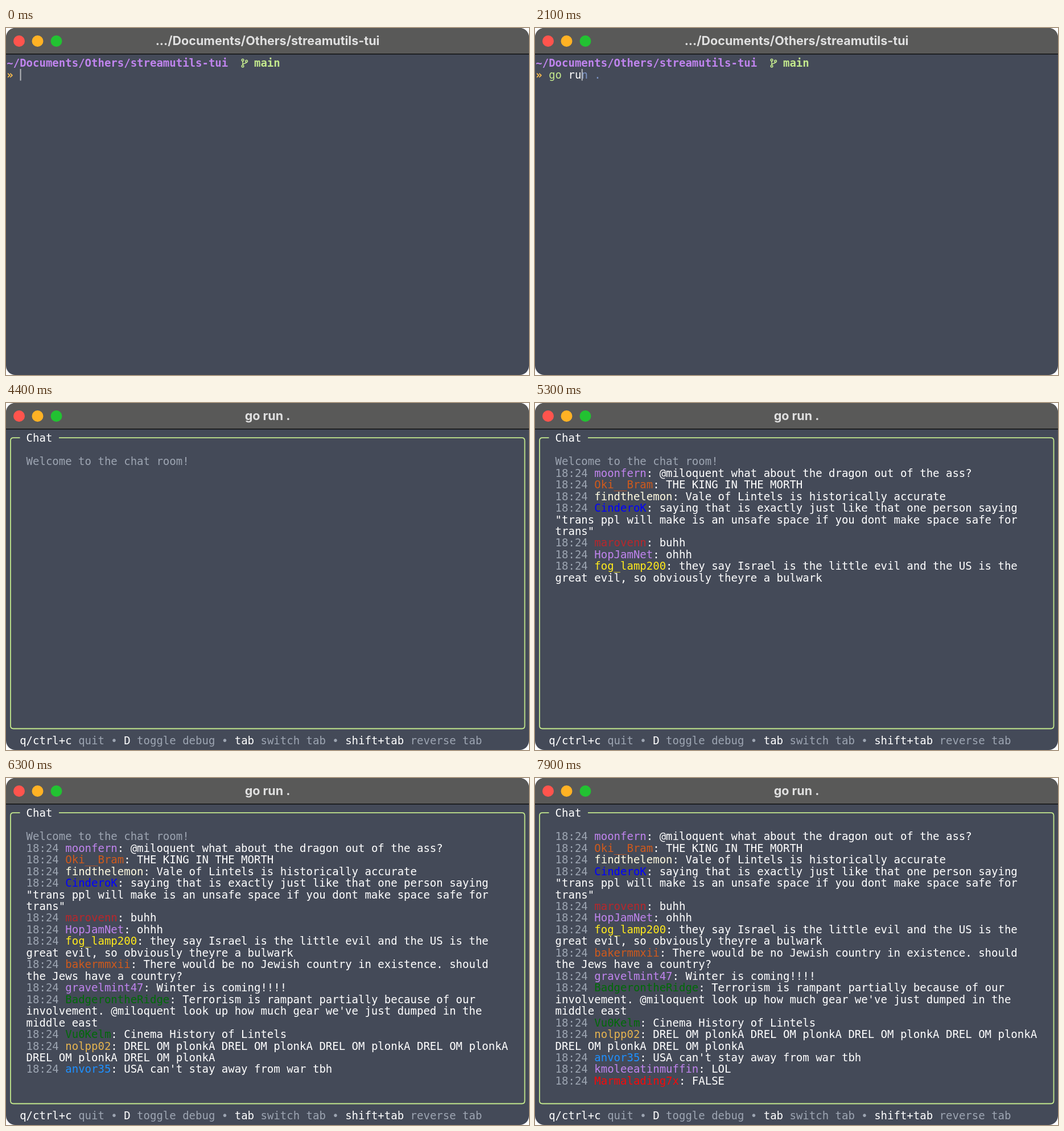
Write an HTML page that moves like this. It is 919 by 610 pixels and loops after 8000 ms.

```html
<!DOCTYPE html>
<html lang="en">
<head>
<meta charset="utf-8">
<title>Terminal chat</title>
<style>
html, body { margin: 0; width: 100%; height: 100%; overflow: hidden; background: #fff; }
svg { display: block; }
text { white-space: pre; }
#screen { font: 19px "DejaVu Sans Mono", "Liberation Mono", monospace; fill: #fff; }
#title { font: 700 21.5px Inter, "Open Sans", sans-serif; fill: #e0e0e0; text-anchor: middle; }
</style>
</head>
<body>
<svg width="919" height="610" viewBox="0 0 919 610">
  <clipPath id="win"><rect width="919" height="610" rx="16.5"/></clipPath>
  <g clip-path="url(#win)">
    <rect width="919" height="610" fill="#444a58"/>
    <rect width="919" height="46" fill="#595958"/>
    <rect y="45" width="919" height="1.5" fill="#111"/>
    <circle cx="23" cy="23" r="10" fill="#ff544d"/>
    <circle cx="55.5" cy="23" r="10" fill="#ffb224"/>
    <circle cx="88.5" cy="23" r="10" fill="#22c232"/>
    <text id="title" x="459.5" y="29.5"></text>
    <g id="screen"></g>
  </g>
</svg>
<script>
const LOOP = 8000, ENTER = 2900, START = 3800;
const CELL = 11.438, ROW = 20.46, LEFT = 1.3, BASE = 68.3;
const WRAP = 74, VISIBLE = 22;
const WHITE = '#fff', GREY = '#9da5b2', GREEN = '#c3e88d', PURPLE = '#c084ee', GOLD = '#ffc04d';
const ORANGE = '#d05a1c', DARK_GREEN = '#006a08';

const command = 'go run .';
const keyTimes = [1500, 1600, 1800, 1900, 2050, 2200, 2350, 2500];

// arrival time, name colour, name, message
const messages = [
  [4600, PURPLE, 'moonfern', '@miloquent what about the dragon out of the ass?'],
  [4700, ORANGE, 'Oki__Bram', 'THE KING IN THE MORTH'],
  [4800, '#fffbe0', 'findthelemon', 'Vale of Lintels is historically accurate'],
  [4900, '#0000ff', 'CinderoK', 'saying that is exactly just like that one person saying "trans ppl will make is an unsafe space if you dont make space safe for trans"'],
  [5000, '#b8272c', 'marovenn', 'buhh'],
  [5100, PURPLE, 'HopJamNet', 'ohhh'],
  [5200, '#ffea1c', 'fog_lamp200', 'they say Israel is the little evil and the US is the great evil, so obviously theyre a bulwark'],
  [5500, ORANGE, 'bakermmxii', 'There would be no Jewish country in existence. should the Jews have a country?'],
  [5650, PURPLE, 'gravelmint47', 'Winter is coming!!!!'],
  [5800, DARK_GREEN, 'BadgerontheRidge', "Terrorism is rampant partially because of our involvement. @miloquent look up how much gear we've just dumped in the middle east"],
  [5950, DARK_GREEN, 'Vu0Kelm', 'Cinema History of Lintels'],
  [6100, '#e6b450', 'nolpp02', Array(6).fill('DREL OM plonkA').join(' ')],
  [6200, '#1e90ff', 'anvor35', "USA can't stay away from war tbh"],
  [7000, PURPLE, 'kmoleeatinmuffin', 'LOL'],
  [7800, '#f50a0a', 'Marmalading7x', 'FALSE']
];

const escape = s => s.replace(/&/g, '&amp;').replace(/</g, '&lt;');
const col = c => LEFT + c * CELL;

// Draws [colour, string] parts from a cell onwards.
function line(row, column, parts, attrs = '') {
  const spans = parts.map(([fill, s]) => `<tspan fill="${fill}">${escape(s)}</tspan>`).join('');
  return `<text x="${col(column)}" y="${BASE + row * ROW}" ${attrs}>${spans}</text>`;
}

function wrap(text) {
  const lines = [''];
  for (const word of text.split(' ')) {
    const last = lines[lines.length - 1];
    if (!last) lines[lines.length - 1] = word;
    else if (last.length + 1 + word.length <= WRAP) lines[lines.length - 1] += ' ' + word;
    else lines.push(word);
  }
  return lines;
}

const chatLines = messages.flatMap(([time, colour, name, body]) => {
  const [first, ...rest] = wrap(`18:24 ${name}: ${body}`);
  const head = [[GREY, '18:24 '], [colour, name], [WHITE, first.slice(6 + name.length)]];
  return [head, ...rest.map(s => [[WHITE, s]])].map(parts => ({ time, parts }));
});
chatLines.unshift({ time: START, parts: [[GREY, 'Welcome to the chat room!']] });

const branchIcon = `<g fill="none" stroke="${GREEN}" stroke-width="1.6">
  <circle cx="416" cy="56.3" r="1.8"/><circle cx="422.6" cy="58.3" r="1.8"/><circle cx="416" cy="67" r="1.8"/>
  <path d="M416 58v7M422.6 60c0 3-6.6 1.5-6.6 4.5"/></g>`;

function shell(t) {
  const typed = keyTimes.filter(k => k <= t).length;
  const entered = t >= ENTER;
  const hint = typed ? command.slice(typed) : '';
  const cursorX = col(entered ? 0 : 2 + typed);
  const cursorY = 72 + (entered ? ROW : 0);
  return line(0, 0, [[PURPLE, '~/Documents/Others/streamutils-tui']], 'font-weight="700"') +
    branchIcon +
    line(0, 38, [[GREEN, 'main']], 'font-weight="700"') +
    line(1, 0, [[GOLD, '»']], 'font-weight="700"') +
    line(1, 2, [
      [GREEN, command.slice(0, Math.min(typed, 2))],
      [WHITE, command.slice(2, Math.max(typed, 2))],
      ['#7c93c4', hint]
    ]) +
    `<rect x="${cursorX + 0.4}" y="${cursorY}" width="2" height="20.5" fill="#b4b6ba"/>`;
}

function chat(t) {
  const rows = chatLines.filter(l => l.time <= t).slice(-VISIBLE);
  const help = [['q/ctrl+c', 'quit'], ['D', 'toggle debug'], ['tab', 'switch tab'], ['shift+tab', 'reverse tab']];
  const footer = help.flatMap(([key, what], i) => [[WHITE, key], [GREY, ` ${what}${i < 3 ? ' • ' : ''}`]]);
  return `<path d="M24.5 61.2H13Q8 61.2 8 66.2V567.5Q8 572.5 13 572.5H906.5Q911.5 572.5 911.5 567.5V66.2Q911.5 61.2 906.5 61.2H93"
    fill="none" stroke="${GREEN}" stroke-width="1.8"/>` +
    line(0, 3, [[WHITE, 'Chat']]) +
    rows.map((l, i) => line(2 + i, 3, l.parts)).join('') +
    line(26, 2, footer);
}

const screen = document.getElementById('screen');
const title = document.getElementById('title');
let shown = '';

function draw(now) {
  const t = now % LOOP;
  const html = t < START ? shell(t) : chat(t);
  title.textContent = t < ENTER ? '.../Documents/Others/streamutils-tui' : command;
  if (html !== shown) screen.innerHTML = shown = html;
  requestAnimationFrame(draw);
}
draw(performance.now());
</script>
</body>
</html>
```
